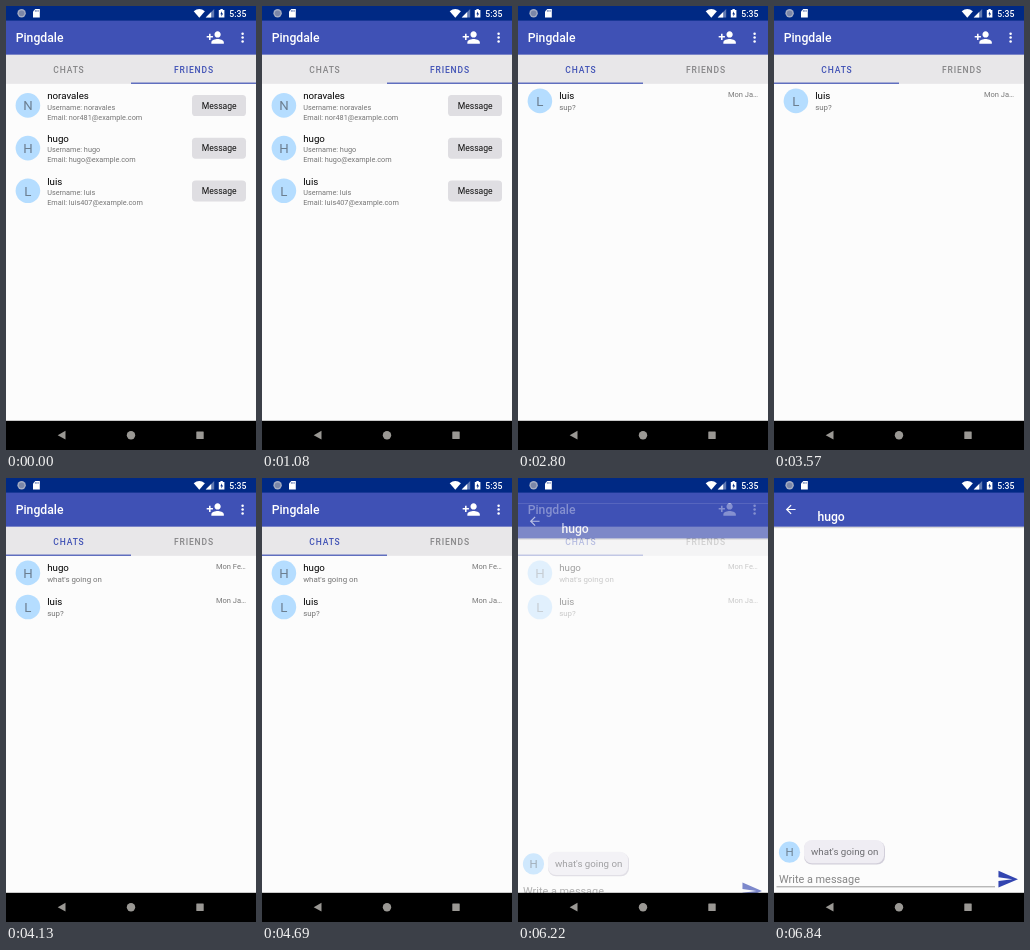
Animation, 250 px wide and 444 px high, one loop 6890 ms. Source, as an HTML page:

```html
<!DOCTYPE html>
<html lang="en">
<head>
<meta charset="utf-8">
<title>Chat demo</title>
<style>
  html, body { margin: 0; width: 100%; height: 100%; overflow: hidden; background: #fcfcfc; }
  svg { display: block; width: 100%; height: 100%; font-family: Roboto, "Noto Sans", sans-serif; }
  .medium { font-weight: 500; }
  .tab { font-weight: 500; font-size: 8.5px; letter-spacing: .85px; }
</style>
</head>
<body>
<svg viewBox="0 0 250 444">
  <defs>
    <linearGradient id="shade" x2="0" y2="1">
      <stop offset="0" stop-color="#000" stop-opacity=".24"/>
      <stop offset="1" stop-color="#000" stop-opacity="0"/>
    </linearGradient>
  </defs>
  <rect width="250" height="444" fill="#fcfcfc"/>

  <g id="home">
    <g id="chats"></g>
    <g id="friends"></g>
    <rect y="48" width="250" height="29.8" fill="#e8e7e9"/>
    <rect y="14" width="250" height="34.65" fill="#3f51b5"/>
    <text class="medium" x="9.7" y="36" font-size="12.2" fill="#fff">Pingdale</text>
    <path transform="translate(199.9 22.2) scale(.78)" fill="#fff" d="M15 12c2.21 0 4-1.79 4-4s-1.79-4-4-4-4 1.79-4 4 1.79 4 4 4zm-9-2V7H4v3H1v2h3v3h2v-3h3v-2H6zm9 4c-2.67 0-8 1.34-8 4v2h16v-2c0-2.66-5.33-4-8-4z"/>
    <g fill="#fff">
      <circle cx="236.6" cy="27.8" r="1.25"/>
      <circle cx="236.6" cy="31.6" r="1.25"/>
      <circle cx="236.6" cy="35.4" r="1.25"/>
    </g>
    <text class="tab" id="tabChats" x="47.3" y="66.7">CHATS</text>
    <text class="tab" id="tabFriends" x="168" y="66.7">FRIENDS</text>
    <rect id="marker" y="76.6" width="125" height="1.2" fill="#3f51b5"/>
  </g>

  <g id="talk">
    <rect y="14" width="250" height="401" fill="#fcfcfc"/>
    <rect y="48.6" width="250" height="2.2" fill="url(#shade)"/>
    <rect y="14" width="250" height="34.65" fill="#3f51b5"/>
    <path transform="translate(9.4 24.2) scale(.608)" fill="#fff" d="M20 11H7.83l5.59-5.59L12 4l-8 8 8 8 1.41-1.41L7.83 13H20v-2z"/>
    <text class="medium" x="43.4" y="43.4" font-size="12.2" fill="#fff">hugo</text>
    <g id="sender"></g>
    <rect x="30" y="363" width="81" height="23.5" rx="8" fill="#d2cfda"/>
    <rect x="30" y="362" width="80" height="23.3" rx="8" fill="#efedf3"/>
    <text x="37" y="377" font-size="9.73" fill="#6c6c70">what's going on</text>
    <text x="5" y="405" font-size="10.9" fill="#858585">Write a message</text>
    <path d="M2.5 408.8H221" stroke="#858585" stroke-width=".8"/>
    <path transform="translate(222.6 390) scale(.93)" fill="#3345b0" d="M2.01 21L23 12 2.01 3 2 10l15 2-15 2z"/>
  </g>

  <rect width="250" height="14.6" fill="#002984"/>
  <circle cx="15.6" cy="7.2" r="4.2" fill="#a5adc2"/>
  <circle cx="15.6" cy="7.2" r="2.8" fill="#7b87a8"/>
  <path d="M29.3 3h4.5v8.4h-6.8V5.4z" fill="#fff"/>
  <path d="M29.4 4.2v1.5M30.8 4.2v1.5M32.2 4.2v1.5" stroke="#002984" stroke-width=".6"/>
  <path d="M187.7 5.2Q193.3 1 198.9 5.2L193.3 11.8z" fill="#fff"/>
  <path d="M208.2 3v8.5h-8.5z" fill="#fff" opacity=".38"/>
  <path d="M205.2 6v5.5h-5.5z" fill="#fff"/>
  <path d="M212.8 4h1.6V3h2.4v1h1.6v7.6h-5.6z" fill="#fff"/>
  <path d="M216 5.2l-1.7 3h1.1v2.2l1.7-3H216z" fill="#002984"/>
  <text class="medium" x="223.3" y="10.6" font-size="8.7" fill="#fff">5:35</text>

  <rect y="414.8" width="250" height="29.2" fill="#000"/>
  <g fill="#9a9894">
    <path d="M51.7 429.2l7.8-4.4v8.8z"/>
    <circle cx="125" cy="429.2" r="4.2"/>
    <rect x="190.3" y="425.5" width="7.4" height="7.4" rx=".5"/>
  </g>
</svg>

<script>
const LOOP = 6890;
const SWIPE = { start: 1400, length: 320 };
const NEW_CHAT = 4130;
const OPEN = { start: 6150, length: 250 };
const BLUE = '#3f51b5', GREY = '#858587';

const byId = id => document.getElementById(id);
const label = (x, y, size, color, words, extra = '') =>
  `<text x="${x}" y="${y}" font-size="${size}" fill="${color}" ${extra}>${words}</text>`;

const avatar = (x, y, r, name) =>
  `<circle cx="${x}" cy="${y}" r="${r}" fill="#b5ddff"/>` +
  label(x, y + r * .4, r * 1.08, '#6c7f90', name[0].toUpperCase(), 'text-anchor="middle"');

const friendRow = ([name, mail], i) => `<g transform="translate(0 ${i * 42.7})">
  ${avatar(21.9, 99.4, 12.3, name)}
  ${label(41.2, 93.2, 9.73, '#000', name)}
  ${label(41.2, 103.5, 7.3, '#757575', 'Username: ' + name)}
  ${label(41.2, 113.6, 7.3, '#757575', `Email: ${mail}@example.com`)}
  <rect x="186" y="89" width="54" height="21" rx="3.6" fill="#dfdee2"/>
  ${label(213.2, 102.7, 8.6, '#111', 'Message', 'text-anchor="middle"')}
</g>`;

const chatRow = ([name, words, date]) => `<g id="${name}">
  ${avatar(21.9, 94.9, 12.3, name)}
  ${label(41.2, 93.2, 9.73, '#000', name)}
  ${label(41.2, 104.4, 7.9, '#757575', words)}
  ${label(210, 91, 7.5, '#757575', date)}
</g>`;

byId('friends').innerHTML = [
  ['noravales', 'nor481'], ['hugo', 'hugo'], ['luis', 'luis407']
].map(friendRow).join('');
byId('chats').innerHTML = [
  ['hugo', "what's going on", 'Mon Fe…'], ['luis', 'sup?', 'Mon Ja…']
].map(chatRow).join('');
byId('sender').innerHTML = avatar(15.5, 374.2, 10.6, 'hugo');

const move = (id, x, y = 0) => byId(id).setAttribute('transform', `translate(${x} ${y})`);
const show = (id, on) => byId(id).setAttribute('visibility', on ? 'visible' : 'hidden');
const easeOut = (t, { start, length }) => {
  const p = Math.min(1, Math.max(0, (t - start) / length));
  return 1 - (1 - p) ** 3;
};

function draw(t) {
  const swipe = easeOut(t, SWIPE);
  move('chats', 250 * (swipe - 1));
  move('friends', 250 * swipe);
  move('marker', 125 * (1 - swipe));
  byId('tabChats').setAttribute('fill', swipe > .5 ? BLUE : GREY);
  byId('tabFriends').setAttribute('fill', swipe > .5 ? GREY : BLUE);

  const arrived = t >= NEW_CHAT;
  show('hugo', arrived);
  move('luis', 0, arrived ? 34.1 : 0);

  const open = easeOut(t, OPEN);
  show('talk', open > 0);
  byId('talk').setAttribute('opacity', open);
  move('talk', 0, 32 * (1 - open));
}

const began = performance.now();
function tick() {
  draw((performance.now() - began) % LOOP);
  requestAnimationFrame(tick);
}
tick();
</script>
</body>
</html>
```
